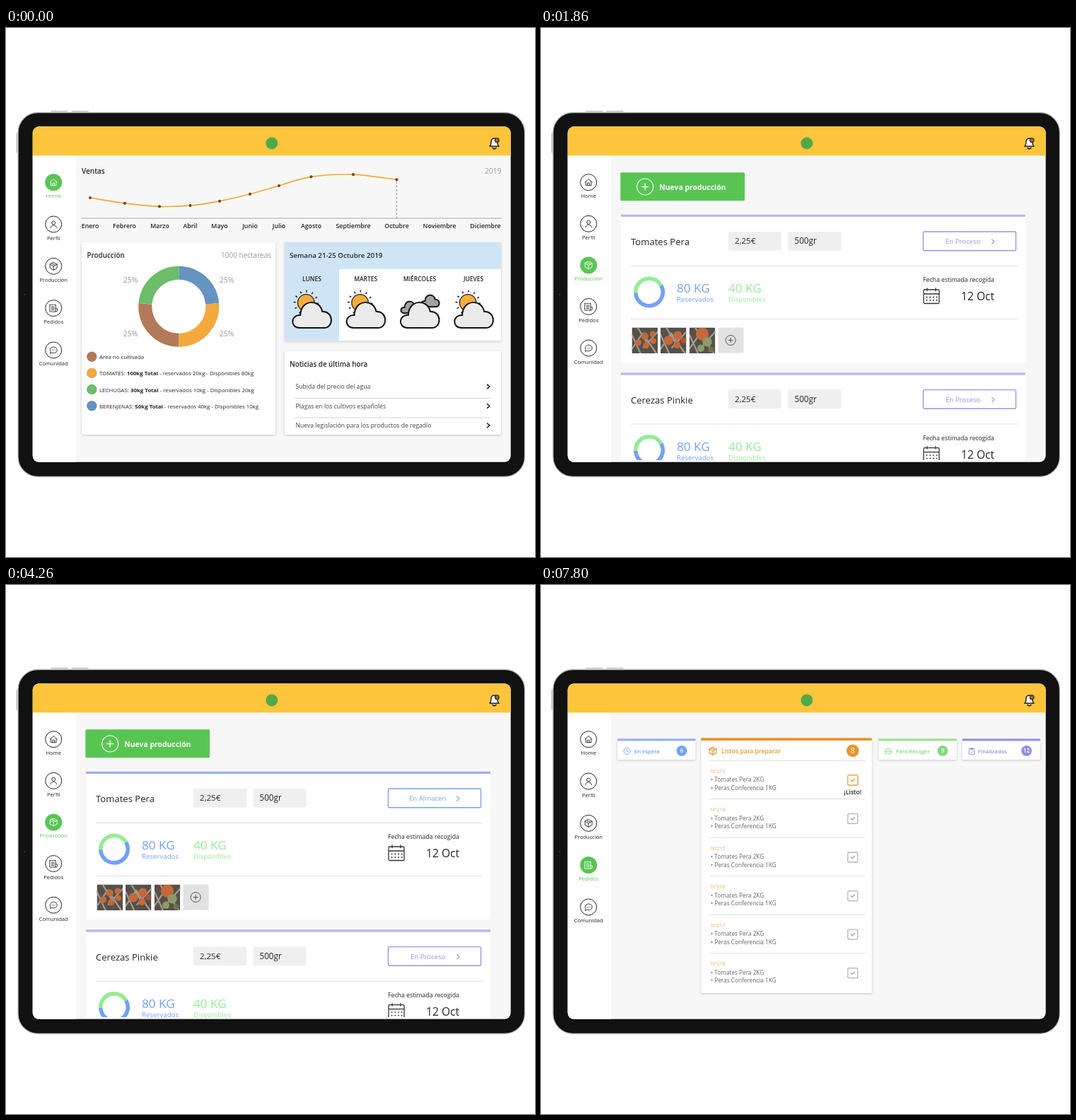
Animation, 748 px wide and 748 px high, one loop 8000 ms. Source, as an HTML page:

```html
<!DOCTYPE html>
<html lang="es">
<head>
<meta charset="utf-8">
<title>Panel de producción</title>
<style>
  html, body { margin: 0; width: 100%; height: 100%; overflow: hidden; background: #fff; }
  svg { display: block; width: 100%; height: 100%; font-family: "Open Sans", "Noto Sans", sans-serif; }
  .card { fill: #fff; filter: drop-shadow(0 1px 1.5px #0003); }
  .line { fill: none; stroke-linecap: round; stroke-linejoin: round; }
</style>
</head>
<body>
<svg id="stage" viewBox="0 0 748 748"></svg>
<script>
const DARK = '#262626', GRAY = '#999', GREEN = '#58c553', LILAC = '#9a94e6', SKY = '#73a1f8';
const MINT = '#93ec93', ORANGE = '#e8962e';

// Drawing helpers
const text = (x, y, s, size, fill = DARK, weight = 400, anchor = 'start') =>
  `<text x="${x}" y="${y}" font-size="${size}" fill="${fill}" font-weight="${weight}" text-anchor="${anchor}">${s}</text>`;
const rect = (x, y, w, h, fill, extra = '') =>
  `<rect x="${x}" y="${y}" width="${w}" height="${h}" fill="${fill}" ${extra}/>`;
const card = (x, y, w, h) => rect(x, y, w, h, '#fff', 'class="card" rx="1.5"');
const disc = (x, y, r, fill, extra = '') => `<circle cx="${x}" cy="${y}" r="${r}" fill="${fill}" ${extra}/>`;
const line = (d, color = DARK, width = 1, extra = '') =>
  `<path class="line" d="${d}" stroke="${color}" stroke-width="${width}" ${extra}/>`;
const rule = (x1, x2, y, color = '#e0e0e0') => line(`M${x1} ${y}H${x2}`, color);
const at = (x, y, s, scale = 1) => `<g transform="translate(${x} ${y}) scale(${scale})">${s}</g>`;
const group = (id, s) => `<g id="${id}">${s}</g>`;
// Ring segment between two clockwise angles measured from the top
const arc = (x, y, r, width, from, to, color) =>
  disc(x, y, r, 'none', `stroke="${color}" stroke-width="${width}" pathLength="360"
    stroke-dasharray="${to - from} 360" transform="rotate(${from - 90} ${x} ${y})"`);

const ICONS = {
  Home: 'M-5 0L0-4.7 5 0M-3.8-1V4.5H3.8V-1M-1.4 4.5V1H1.4V4.5',
  Perfil: 'M-2.5-2a2.5 2.5 0 1 0 5 0a2.5 2.5 0 1 0-5 0M-4.4 5C-4 .2 4 .2 4.4 5',
  Producción: 'M0-5.3L5-2.7V2.7L0 5.4-5 2.7V-2.7ZM-5-2.7L0 0 5-2.7M0 0V5.4M-2.5-4L2.5-1.4',
  Pedidos: 'M-5-5L-3.7-4.2-2.3-5-1-4.2 .3-5 1.6-4.2 3-5V5H-5ZM3 .8H5.5V3.5Q5.5 5 3 5M-3-1.8H1M-3 .3H1M-3 2.5H1',
  Comunidad: 'M-4.6 4.6L-4.2 2A4.9 4.4 0 1 1-2 3.9ZM-2 0h.1M0 0h.1M2 0h.1',
};

function sidebar(active, pitch) {
  return Object.entries(ICONS).map(([name, d], i) => {
    const y = 218.2 + pitch * i, on = name === active;
    return disc(67.2, y, on ? 12 : 11.5, on ? GREEN : '#fff', on ? '' : `stroke="${DARK}"`) +
      at(67.2, y, line(d, on ? '#fff' : DARK, .9)) +
      text(67.2, y + 22, name, 7.55, on ? GREEN : DARK, 400, 'middle');
  }).join('');
}

// Smooth curve through a list of points
function curve(p) {
  let d = `M${p[0]}`;
  for (let i = 0; i < p.length - 1; i++) {
    const a = p[i - 1] || p[i], b = p[i], c = p[i + 1], e = p[i + 2] || c;
    d += `C${b[0] + (c[0] - a[0]) / 6} ${b[1] + (c[1] - a[1]) / 6} ${c[0] - (e[0] - b[0]) / 6} ${c[1] - (e[1] - b[1]) / 6} ${c}`;
  }
  return d;
}

function sales() {
  const points = [[119, 240], [168, 247.8], [217, 252.3], [260.5, 251], [302, 244.8],
    [345, 234.8], [386, 223], [431.5, 210.4], [491, 207.2], [552.5, 214.4]];
  const months = { Enero: 119, Febrero: 167.5, Marzo: 217.5, Abril: 260.5, Mayo: 302, Junio: 345, Julio: 386,
    Agosto: 431.5, Septiembre: 491, Octubre: 552.5, Noviembre: 613, Diciembre: 678 };
  return text(107, 205.5, 'Ventas', 10, DARK, 600) + text(700.5, 205.5, '2019', 10.3, GRAY, 500, 'end') +
    rule(107, 700, 269, '#aaa') + line('M552.5 217V269', '#999', .9, 'stroke-dasharray="3 2.5"') +
    line(curve(points), '#f5a92f', 1.7) + points.map(p => disc(...p, 2.1, '#6b4a2c')).join('') +
    Object.entries(months).map(([m, x]) => text(x, 283, m, 8.8, DARK, 600, 'middle')).join('');
}

function production() {
  const slices = [['#6494bf', 0, 85.2], ['#f3a93c', 85.2, 180], ['#b2795a', 180, 274.8], ['#6dbd6b', 274.8, 360]];
  const legend = [['#b2795a', 'Area no cultivada'],
    ['#f3a93c', 'TOMATES: <tspan font-weight="700">100kg Total</tspan> - reservados 20kg - Disponibles 80kg'],
    ['#6dbd6b', 'LECHUGAS: <tspan font-weight="700">30kg Total</tspan> - reservados 10kg - Disponibles 20kg'],
    ['#6494bf', 'BERENJENAS: <tspan font-weight="700">50kg Total</tspan> - reservados 40kg - Disponibles 10kg']];
  return card(107, 302.5, 274, 272.5) + text(114.5, 324.5, 'Producción', 9.85, DARK, 600) +
    text(375, 324.5, '1000 hectareas', 10, GRAY, 500, 'end') +
    slices.map(([c, a, b]) => arc(244.3, 393.8, 47.5, 19, a, b, c)).join('') +
    [[176, 360], [312, 360], [176, 436], [312, 436]].map(([x, y]) => text(x, y, '25%', 10.5, GRAY, 400, 'middle')).join('') +
    legend.map(([c, s], i) => disc(121.3, 464.7 + 23.2 * i, 7, c, 'stroke="#0003" stroke-width=".6"') +
      text(132, 467.7 + 23.5 * i, s, 7.85)).join('');
}

const cloud = fill => `<path d="M-17 18C-31 18-30-1-16 0C-16-22 11-24 15-5C31-6 32 18 17 18Z" fill="${fill}"
  stroke="#111" stroke-width="2" vector-effect="non-scaling-stroke"/>`;
const sun = disc(-8, -17.5, 11.8, '#f7ad3c', 'stroke="#222" stroke-width="1.3"') +
  disc(-8, -17.5, 16.2, 'none', 'stroke="#222" stroke-width="3" pathLength="12" stroke-dasharray=".19 .81"');

function weather() {
  const greys = at(-14, -11, cloud('#a3a3a3'), .46) + at(15, -20, cloud('#a3a3a3'), .46);
  return card(394, 303, 306, 139.5) + rect(394, 303, 306, 38, '#cfe5f6') + rect(394, 340, 77, 102.5, '#cfe5f6') +
    text(401, 325, 'Semana 21-25 Octubre 2019', 9.75, DARK, 600) +
    ['LUNES', 'MARTES', 'MIÉRCOLES', 'JUEVES'].map((day, i) =>
      text(432.5 + 76.2 * i, 357.5, day, 8.5, DARK, 600, 'middle') +
      at(432.3 + 76.3 * i, 406, (i === 2 ? greys : sun) + cloud('#ebebeb'))).join('');
}

function news() {
  const items = ['Subida del precio del agua', 'Plagas en los cultivos españoles', 'Nueva legislación para los productos de regadío'];
  return card(394, 457, 306, 118) + text(401, 479, 'Noticias de última hora', 9.8, DARK, 600) +
    items.map((s, i) => text(409.5, 510 + 27.5 * i, s, 8.65, '#444') +
      line(`M680.5 ${504.2 + 27.4 * i}l3.3 2.9-3.3 2.9`, '#222', 1.6) +
      (i < 2 ? rule(408, 685, 523.5 + 27.5 * i, '#d5d5d5') : '')).join('');
}

// Thumbnails reduced to soft shapes
function photo(x, fruits) {
  return `<svg x="${x}" y="423.5" width="36.5" height="36.5" viewBox="0 0 36 36">` + rect(0, 0, 36, 36, '#55504a') +
    line('M0 30L15 8 34 36M8 0L20 20M36 6L16 28M0 10L12 36', '#a39b90', 2.2) +
    fruits.map(([cx, cy, r, c]) => disc(cx, cy, r, c)).join('') + '</svg>';
}
const RED = '#c4683a', LEAF = '#8f9a68';
const photos = photo(128.5, [[9, 21, 4.5, RED], [18, 12, 5, RED], [29, 9, 4, RED], [20, 25, 4.5, RED], [30, 19, 4, RED]]) +
  photo(169, [[11, 18, 6.5, RED], [24, 11, 6, RED], [23, 24, 5, RED], [32, 18, 4, '#a95530']]) +
  photo(209.8, [[18, 9, 9, RED], [25, 20, 6.5, LEAF], [16, 29, 5, LEAF], [30, 31, 4, '#6d7550']]);

const button = (label, x, color) => rect(540.5, 288, 131, 26.7, '#fff', `rx="2" stroke="${color}" stroke-width="1.4"`) +
  text(x, 305, label, 9.6, color, 500) + line('M637.7 299l3.2 3-3.2 3', color, 1.3);
const topBar = color => rect(113, 263.7, 572, 3.4, color, 'rx="1"');
const inProcess = topBar('#c0b6ee') + button('En Proceso', 572, LILAC);
const stored = topBar('#9db0ee') + button('En Almacen', 570, '#74a3ef');
const calendar = line('M541 371.5q0-1.5 1.5-1.5h19q1.500 0 1.500 1.500v16.500q0 1.500-1.500 1.500h-19q-1.500 0-1.500-1.500zM541 376H563M546 368v3.500M558 368v3.500', '#333', 1.3) +
  line('M545.500 380.500H560M545.500 385H560', '#333', 1.800, 'stroke-dasharray=".1 4.600"');

function product(name, extras) {
  return rect(113, 265, 572, 207.5, '#fff') + text(127, 307.3, name, 13.1, DARK, 500) +
    rect(265, 288, 75, 26.5, '#efefef', 'rx="1"') + text(274, 305.3, '2,25€', 11.6) +
    rect(349.5, 288, 75, 26.5, '#efefef', 'rx="1"') + text(358.5, 305.3, '500gr', 11.7) +
    rule(127, 674, 336.5) + rule(127, 674, 411.5) +
    arc(153, 373.5, 19.3, 5.6, 60, 268, SKY) + arc(153, 373.5, 19.3, 5.6, 268, 420, MINT) +
    text(192, 374, '80 KG', 17.2, SKY, 500) + text(192, 387, 'Reservados', 9.7, SKY, 500) +
    text(265, 374, '40 KG', 17.2, MINT, 500) + text(265, 387, 'Disponibles', 9.7, MINT, 500) +
    text(540, 359.2, 'Fecha estimada recogida', 8.75, DARK, 500) + calendar + text(594, 385.3, '12 Oct', 15.6, DARK, 500) +
    photos + rect(250.5, 423.5, 36, 36, '#e2e2e2', 'rx="1.5"') +
    disc(268.2, 441.5, 7, 'none', 'stroke="#555"') + line('M265 441.5h6.4M268.2 438.3v6.4', '#555') + extras;
}

const dropdown = rect(540.5, 287.7, 131.500, 109.300, '#f7f7f7', `rx="2" stroke="${LILAC}" stroke-width="1.500"`) +
  rect(541.3, 288.500, 130, 26, '#fff') + text(572, 304.800, 'En proceso', 9.600, LILAC, 500) +
  line('M637.500 303.200l3-3 3 3', LILAC, 1.400) +
  text(549.500, 343.700, 'En el almacen', 9.900, DARK, 500) + text(549.500, 373.700, 'Finalizado', 9.900, DARK, 500);

const notice = card(558, 181, 147.5, 71) + '<path d="M684.500 182L690.500 174.500 696.500 182Z" fill="#fff"/>' +
  ['¡Ya tienes listos para', 'preparar 6 pedidos', 'nuevos!'].map((s, i) => text(571, 205.3 + 13.8 * i, s, 10.6, DARK, 500)).join('');

function productPage() {
  return sidebar('Producción', 58.6) + rect(112.3, 204.3, 175.7, 40, GREEN, 'rx="1.5"') +
    disc(147.2, 224.5, 11.5, 'none', 'stroke="#fff" stroke-width="1.2"') + line('M142.700 224.500h9M147.200 220v9', '#fff', 1.300) +
    text(167.3, 228.500, 'Nueva producción', 10.400, '#fff', 700) +
    '<g clip-path="url(#fold)">' + product('Tomates Pera', group('waiting', inProcess) + group('stored', stored)) +
    at(0, 223.6, product('Cerezas Pinkie', inProcess)) + '</g>' + group('menu', dropdown) + group('notice', notice);
}

const column = (x, label, color, badge, count, icon, tx, bx) => card(x, 218, 110.5, 29) +
  rect(x, 217.2, 110.5, 3.3, color, 'rx="1"') + at(x + 13.6, 235, line(icon, badge, .9)) +
  text(tx, 237.8, label, 7.6, badge, 600) + disc(bx, 234.4, 7.4, badge) + text(bx, 237.3, count, 8, '#fff', 600, 'middle');

const checkbox = (y, color, tick) => rect(433.8, y - 7, 14, 14, '#fff', `rx="2" stroke="${color}" stroke-width="1.3"`) +
  line(`M438.300 ${y}l1.800 1.800 3.300-3.300`, tick, 1.400);

function ordersPage() {
  const rows = [213, 214, 215, 216, 217, 218].map((n, i) => {
    const y = 54.55 * i;
    return text(240, 266.3 + y, 'Nº' + n, 7.3, '#f0ab62') + text(240, 278.8 + y, '• Tomates Pera 2KG', 8.25, '#666') +
      text(240, 290.3 + y, '• Peras Conferencia 1KG', 8.25, '#666') + checkbox(276.5 + y, '#b5b5b5', '#aaa') +
      (i < 5 ? rule(238, 458, 303.2 + y) : '');
  }).join('');
  return sidebar('Pedidos', 59.3) +
    column(108, 'En espera', '#9ab2ec', '#73a1f5', 6, 'M-4.500 0a4.500 4.500 0 1 0 9 0a4.500 4.500 0 1 0-9 0M0-2.500V0L2 1', 132, 199) +
    column(477.3, 'Para Recoger', '#a1de9d', '#7fda7b', 9, 'M-4.500 3V0L-2.500-3.500H2.500L4.500 0V3ZM-4.500 0H4.500M-2.500 1.500h.1M2.500 1.500h.1', 501.7, 568) +
    column(595.5, 'Finalizados', '#9596e8', '#8f90e6', 12, 'M-3.500-3.500H3.500V4.500H-3.500ZM-1.500-4.500H1.500V-2.500H-1.500ZM-1.700 1L-.4 2.300 2-.2', 618, 686.5) +
    card(226.3, 217, 241.500, 360) + rect(226.3, 216.3, 241.500, 3.800, ORANGE, 'rx="1"') +
    at(243, 234.700, line(ICONS.Producción, ORANGE, 1.200)) + text(255, 238, 'Listos para preparar', 8.650, ORANGE, 600) +
    disc(440.8, 234.3, 8.8, ORANGE) + text(440.8, 238, 8, 10, '#fff', 500, 'middle') + rule(238, 458, 248.5) +
    group('rows', rows + group('done', checkbox(276.5, '#f0a24a', ORANGE) + text(440.8, 297, '¡Listo!', 8.7, DARK, 600, 'middle')));
}

const bell = '<path d="M684 167.300C686.500 165 685.500 162.500 686 160C687 154.800 693.500 154.800 694.500 160C695 162.500 694.500 165 697 167.300Z" fill="#fff" stroke="#222" stroke-width="1.500" stroke-linejoin="round"/>' +
  line('M688 169.500q2.500 2.500 5 0', '#222', 1.700) + disc(694.2, 158.700, 2.900, '#a5683f', 'stroke="#222" stroke-width="1.100"');

const device = line('M64 117.600H87M93 117.600H116M15.300 149V176', '#b5b5b5', 1.300) +
  rect(17, 119.500, 716.500, 515, '#111', 'rx="28" stroke="#bdbdbd" stroke-width="1.300"') +
  disc(26.300, 377, 1.300, '#2d2d3a');

document.getElementById('stage').innerHTML =
  '<defs><clipPath id="screen"><rect x="37.700" y="139.300" width="676" height="474.500" rx="9"/></clipPath>' +
  '<clipPath id="fold"><rect x="99" y="180" width="615" height="431"/></clipPath></defs>' + device +
  '<g clip-path="url(#screen)">' + rect(37, 139, 678, 476, '#f7f7f7') + rect(37, 180, 62, 435, '#fff') +
  rect(37, 139, 678, 41.400, '#fcc53b') + disc(375.8, 163, 8.5, '#4fa94a') + bell +
  group('home', sidebar('Home', 59.3) + sales() + production() + weather() + news()) +
  group('products', productPage()) + group('orders', ordersPage()) + '</g>';

const LOOP = 8000, PRODUCTS = 1800, MENU = 3200, STORED = 4060, NOTICE = 5320, ORDERS = 6460, CHECK = 7160;
const part = id => document.getElementById(id);
const show = (id, on) => { part(id).style.display = on ? '' : 'none'; };

function render() {
  const t = performance.now() % LOOP;
  const done = Math.min(1, Math.max(0, (t - CHECK) / 200));
  show('home', t < PRODUCTS);
  show('products', t >= PRODUCTS && t < ORDERS);
  show('orders', t >= ORDERS);
  show('menu', t >= MENU && t < STORED);
  show('waiting', t < STORED);
  show('stored', t >= STORED);
  show('notice', t >= NOTICE);
  part('done').style.opacity = done;
  part('rows').setAttribute('transform', `translate(0 ${-.6 * done})`);
  requestAnimationFrame(render);
}
render();
</script>
</body>
</html>
```
